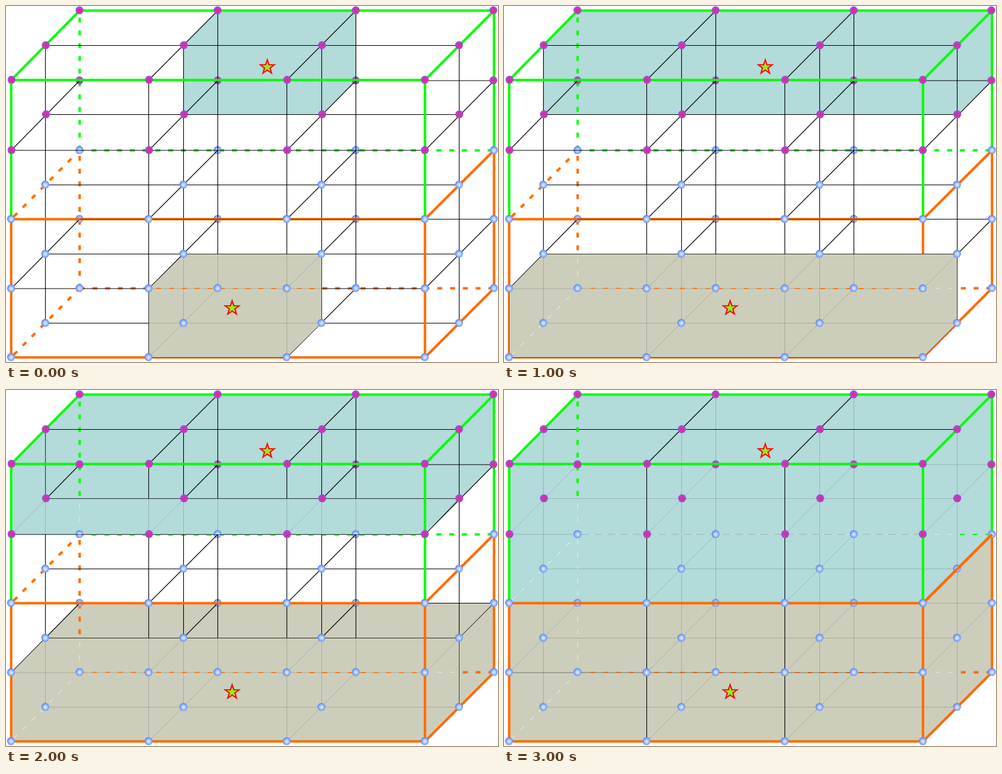
Animation of 805 by 582 pixels, one loop 4000 ms. Source, as an HTML page with a canvas:

```html
<!DOCTYPE html>
<html lang="en">
<head>
<meta charset="utf-8">
<title>Grid cells</title>
<style>
html, body { margin: 0; width: 100%; height: 100%; overflow: hidden; background: #fff; }
canvas { display: block; }
</style>
</head>
<body>
<canvas id="stage" width="805" height="582"></canvas>
<script>
const ctx = document.getElementById('stage').getContext('2d');
const GREEN = '#00ff00', ORANGE = '#ff6a00', TEAL = '#b2dbd9', KHAKI = '#cccebb';
const STEP = 1000, STEPS = 4;

// Lattice: i = column, j = level from the top, k = depth (0 front, 2 back)
const LEVELS = [
  [121, 236, 348.5, 462, 574.5],
  [64.5, 177.5, 292.5, 405.5, 518.5],
  [7.5, 122, 236, 348.5, 461.5]
];
const P = (i, j, k) => [Math.floor(8 + 225.8 * i + 56.4 * k) + 0.5, LEVELS[k][j]];

const thin = [];
const addLine = (a, b) => thin.push([P(...a), P(...b)]);
for (let k = 0; k < 3; k++) {
  for (let j = 0; j < 5; j++) if (k === 1 || j % 2) addLine([0, j, k], [3, j, k]);
  for (let i = 0; i < 4; i++) if (k === 1 || i % 3) addLine([i, 0, k], [i, 4, k]);
}
for (let j = 0; j < 5; j++)
  for (let i = 0; i < 4; i++) if (j % 2 || i % 3) addLine([i, j, 0], [i, j, 2]);

const thick = [
  [ORANGE, [0, 2, 0], [0, 4, 0], [3, 4, 0], [3, 2, 0]],
  [ORANGE, [3, 4, 0], [3, 4, 2], [3, 2, 2]],
  [GREEN, [0, 2, 0], [0, 0, 0], [0, 0, 2], [3, 0, 2], [3, 2, 2]],
  [GREEN, [0, 0, 0], [3, 0, 0], [3, 2, 0]],
  [GREEN, [3, 0, 0], [3, 0, 2]],
  [ORANGE, [0, 2, 0], [3, 2, 0], [3, 2, 2]]
].map(([color, ...pts]) => [color, pts.map(p => P(...p))]);

// color, start, end, length before the first dash
const dashed = [
  [GREEN, P(0, 0, 2), P(0, 2, 2), 11.5],
  [GREEN, P(0, 2, 2), P(3, 2, 2), 19.5],
  [ORANGE, P(0, 2, 2), P(0, 4, 2), 9],
  [ORANGE, P(0, 4, 2), P(3, 4, 2), 0],
  [ORANGE, P(0, 2, 0), P(0, 2, 2), 6],
  [ORANGE, P(0, 4, 0), P(0, 4, 2), 6]
];

function line(pts, color, width) {
  ctx.beginPath();
  pts.forEach(p => ctx.lineTo(...p));
  ctx.strokeStyle = color;
  ctx.lineWidth = width;
  ctx.stroke();
}

function dash([color, a, b, lead], width = 4, tint = color) {
  ctx.setLineDash([8, 12.9]);
  ctx.lineDashOffset = -lead;
  line([a, b], tint, width);
  ctx.setLineDash([]);
}

function dot(i, j, k) {
  let [x, y] = P(i, j, k);
  const purple = j < 2;
  if (purple && k < 2) x += j && k === 1 ? 1.2 : 0.8;
  if (purple && i === 3) x -= 0.8;
  const g = ctx.createRadialGradient(x, y, 0, x, y, 6.5);
  const stops = purple ? ['#ea2c58', '#c23bb0', '#a846e6'] : ['#eef4ff', '#a9c4ff', '#5b86f7'];
  [0, 0.5, 1].forEach((at, n) => g.addColorStop(at, stops[n]));
  ctx.beginPath();
  ctx.arc(x - 0.3, y - 0.4, 6.5, 0, 7);
  ctx.fillStyle = g;
  ctx.fill();
}

const isBack = (j, k) => k === 2 && j > 0 && j < 4;

function dots(back) {
  for (let k = 2; k >= 0; k--)
    for (let j = 0; j < 5; j++)
      for (let i = 0; i < 4; i++)
        if ((isBack(j, k) && i < 3) === back) dot(i, j, k);
}

// Visible silhouette of a box of cells
const box = (i0, i1, j0, j1, k0, k1) => [
  [i0, j0, k0], [i0, j0, k1], [i1, j0, k1], [i1, j1, k1], [i1, j1, k0], [i0, j1, k0]
].map(p => P(...p));
const poly = (...pts) => pts.map(p => P(...p));

function fill(pts, color) {
  ctx.beginPath();
  pts.forEach(p => ctx.lineTo(...p));
  ctx.closePath();
  ctx.fillStyle = color;
  ctx.fill();
}

// A nearly opaque face: lines behind it only shimmer through
function cover([pts, color]) {
  ctx.save();
  fill(pts, color);
  ctx.strokeStyle = 'rgba(0,0,0,.5)';
  ctx.lineWidth = 1;
  ctx.stroke();
  ctx.clip();
  thin.forEach(l => line(l, 'rgba(0,0,0,.17)', 1));
  dashed.forEach(d => dash(d, 1.5, 'rgba(255,255,255,.45)'));
  if (color === KHAKI) dash([ORANGE, P(0, 4, 2), P(3, 3, 0), 0], 1.6);
  dots(true);
  ctx.restore();
}

const scenes = [
  {
    under: [[box(1, 2, 0, 1, 1, 2), TEAL]],
    over: [[box(1, 2, 3, 4, 0, 1), KHAKI]]
  },
  {
    under: [[box(0, 3, 0, 1, 1, 2), TEAL]],
    over: [[box(0, 3, 3, 4, 0, 1), KHAKI]]
  },
  {
    under: [[box(0, 3, 0, 1, 0, 2), TEAL], [box(0, 3, 3, 4, 0, 2), KHAKI]],
    over: [
      [poly([0, 0, 0], [0, 0, 1], [0, 1, 1], [3, 1, 1], [3, 1, 0], [0, 1, 0]), TEAL],
      [box(0, 3, 3, 4, 0, 1), KHAKI],
      [poly([3, 3, 1], [3, 3, 2], [3, 4, 2], [3, 4, 1]), KHAKI]
    ]
  },
  {
    under: [],
    over: [
      [box(0, 3, 0, 2, 0, 2), TEAL],
      [poly([0, 2, 0], [3, 2, 0], [3, 2, 2], [3, 4, 2], [3, 4, 0], [0, 4, 0]), KHAKI]
    ]
  }
];

function star(x, y) {
  ctx.beginPath();
  for (let n = 0; n < 10; n++) {
    const r = n % 2 ? 4.8 : 12, a = n * Math.PI / 5;
    ctx.lineTo(x + r * Math.sin(a), y - r * Math.cos(a));
  }
  ctx.closePath();
  ctx.fillStyle = '#8fee20';
  ctx.fill();
  ctx.strokeStyle = '#ff0000';
  ctx.lineWidth = 2;
  ctx.stroke();
}

function clipped(x, y, w, h, paint) {
  ctx.save();
  ctx.beginPath();
  ctx.rect(x, y, w, h);
  ctx.clip();
  paint();
  ctx.restore();
}

function draw(step) {
  const { under, over } = scenes[step];
  const early = step < 2;
  const outlines = () => thick.forEach(([color, pts]) => line(pts, color, 4));

  ctx.fillStyle = '#fff';
  ctx.fillRect(0, 0, 805, 582);
  under.forEach(([pts, color]) => fill(pts, color));
  dashed.forEach(d => dash(d));
  dots(true);
  thin.forEach(l => line(l, '#000', 1.1));

  if (early) {
    outlines();
    line([P(0, 3, 2), P(3, 3, 2)], 'rgba(0,0,0,.6)', 1);
  }
  over.forEach(cover);
  if (step === 3) {
    line([P(0, 0, 1), P(3, 0, 1)], '#000', 1.1);
    for (const i of [1, 2]) {
      line([P(i, 0, 0), P(i, 0, 2)], '#000', 1.1);
      line([P(i, 0, 0), P(i, 4, 0)], '#000', 1.1);
    }
    line([P(0, 3, 0), P(3, 3, 0)], 'rgba(0,0,0,.3)', 1);
    clipped(110, 0, 20, 173, () => dash(dashed[0]));
    clipped(743, 225, 62, 20, () => dash(dashed[1], 2));
  }
  if (!early) {
    clipped(743, 450, 62, 25, () => dash(dashed[3]));
    outlines();
  }

  dots(false);
  if (!early) dot(0, 1, 2);
  if (step === 3) line([P(3, 2, 0), P(3, 2, 2)], ORANGE, 4), dot(3, 2, 0);
  star(427.5, 100);
  star(370, 493.8);
}

let shown = -1;
const start = performance.now();
function tick() {
  const step = Math.floor((performance.now() - start) / STEP) % STEPS;
  if (step !== shown) draw(shown = step);
  requestAnimationFrame(tick);
}
tick();
</script>
</body>
</html>
```
